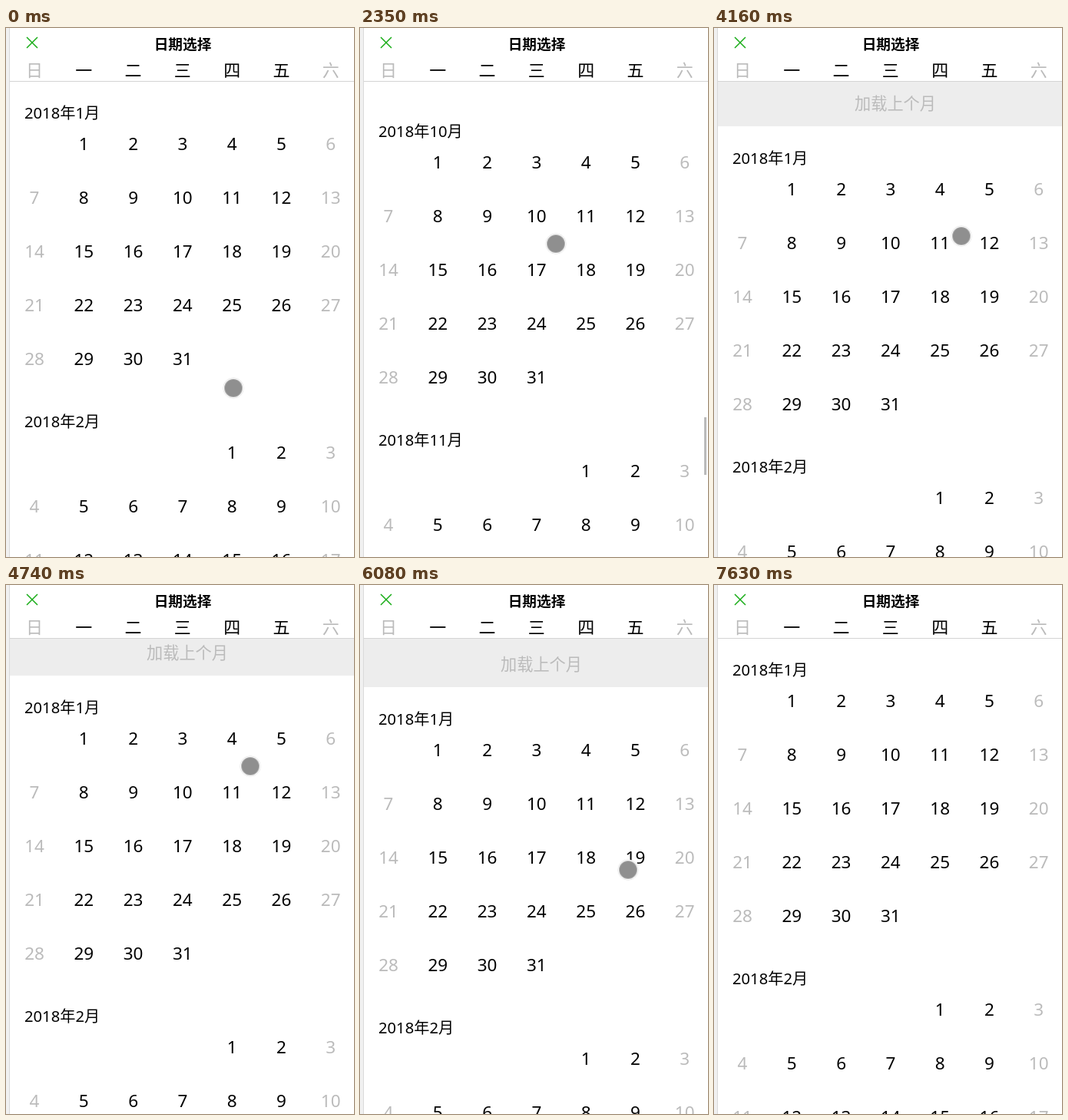
An HTML page for the animation above (8080 ms loop, 453 by 689 pixels).

```html
<!DOCTYPE html>
<html lang="zh">
<head>
<meta charset="utf-8">
<title>日期选择</title>
<style>
  html, body { margin: 0; width: 100%; height: 100%; overflow: hidden; background: #fff; }
  body { position: relative; color: #000; font-family: "Noto Sans", "Noto Sans CJK SC", "Noto Sans CJK", sans-serif; }
  body * { position: absolute; white-space: nowrap; }
  #stage { left: 0; top: 0; width: 453px; height: 689px; overflow: hidden; }
  #edge { left: 0; top: 0; width: 4px; height: 689px; background: #f1f1f1; border-right: 1px solid #dadada; }
  #view { left: 5px; top: 70px; width: 448px; height: 619px; overflow: hidden; }
  #list { left: 0; top: 0; width: 450px; will-change: transform; }
  #band { left: 0; top: -200px; width: 450px; height: 199px; background: #ededed; }
  #band span { left: 178px; bottom: 15px; font-size: 21.2px; line-height: 30px; color: #bbb; }
  .month { left: 19px; font-size: 20.2px; line-height: 30px; }
  .day, .week { width: 64px; text-align: center; line-height: 30px; }
  .day { font-size: 22.5px; }
  .week { font-size: 22px; top: 39px; font-weight: 300; }
  .rest { color: #bbb; }
  #head { left: 5px; top: 0; width: 448px; height: 69px; background: #fff; border-bottom: 1px solid #d4d4d4; }
  #name { left: 0; width: 450px; top: 7px; text-align: center; font-size: 18.7px; font-weight: 700; line-height: 28px; }
  #close { left: 21px; top: 11px; }
  #bar { left: 448px; top: 0; width: 3px; height: 75px; background: #bababa; }
  #dot { left: -11px; top: -11px; width: 22px; height: 22px; border-radius: 50%; background: #8f8f8f;
         box-shadow: 0 0 0 1px #b4b4b4, 0 0 0 2px #fff, 0 0 0 2.5px #ddd; }
</style>
</head>
<body>
<div id="stage">
  <div id="edge"></div>
  <div id="view"><div id="list"><div id="band"><span>加载上个月</span></div></div></div>
  <div id="head">
    <svg id="close" width="16" height="16"><path d="M1 1L15 15M15 1L1 15" stroke="#1aad19" stroke-width="1.5"/></svg>
    <div id="name">日期选择</div>
  </div>
  <div id="bar"></div>
  <div id="dot"></div>
</div>
<script>
const LOOP = 8080, COL = 450 / 7, ROW = 70;
const START = 390, TURN = 2250, BACK = 3970, PULL = 3706, LEAVE = 7000, RETRACT = 7390;
const $ = id => document.getElementById(id);
const list = $('list'), bar = $('bar'), dot = $('dot');

function label(parent, kind, col, text, top) {
  const el = document.createElement('div');
  el.className = kind;
  el.textContent = text;
  if (col !== null) {
    el.style.left = col * COL + 'px';
    if (col % 6 === 0) el.classList.add('rest');
  }
  if (top !== undefined) el.style.top = top + 'px';
  parent.append(el);
}

[...'日一二三四五六'].forEach((ch, i) => label($('head'), 'week', i, ch));

let y0 = 0;
for (let m = 0; m < 12; m++) {
  const first = new Date(2018, m, 1).getDay();
  const days = new Date(2018, m + 1, 0).getDate();
  label(list, 'month', null, `2018年${m + 1}月`, y0 + 25);
  for (let d = 1; d <= days; d++) {
    const cell = first + d - 1;
    label(list, 'day', cell % 7, d, y0 + 66 + Math.floor(cell / 7) * ROW);
  }
  y0 += 52 + Math.ceil((first + days) / 7) * ROW;
}

const ramp = (t, from, to) => {
  const u = Math.min(1, Math.max(0, (t - from) / (to - from)));
  return u * u * (3 - 2 * u);
};

// Eases from one [time, value] key to the next.
const glide = (t, keys) => keys.reduce((v, [time, value], i) =>
  i ? v + (value - keys[i - 1][1]) * ramp(t, keys[i - 1][0], time) : value, 0);

// Flings down the year and back to January.
const scroll = t => 3701 * ramp(t, START, TURN) ** 1.4 * (1 - ramp(t, TURN, BACK));

const dotX = t => glide(t, [[START, 296], [1240, 289], [2350, 255], [4160, 322], [5310, 314], [6080, 349]]);

// Repeated swipes, then slow drags at the top of the list.
const dotY = t => t < PULL
  ? 283 + 186 * Math.cos(2 * Math.PI * Math.max(0, t - START) / 603)
  : glide(t, [[PULL, 97], [4160, 271], [5310, 202], [6080, 371], [6450, 190], [6890, 400]]);

// The list follows the drag like rubber, then snaps back.
const pull = t => t < PULL ? 0
  : 64.2 * (1 - Math.exp(-Math.max(0, dotY(t) - 190) / 31.5)) * (1 - ramp(t, RETRACT, RETRACT + 240));

const move = (el, x, y, shown = true) => {
  el.style.transform = `translate(${Math.round(x)}px, ${Math.round(y)}px)`;
  el.style.visibility = shown ? 'visible' : 'hidden';
};

function draw(t) {
  const s = scroll(t);
  move(list, 0, pull(t) - s);
  move(bar, 0, 72 + s * 0.1187, s >= 1);
  move(dot, dotX(t), dotY(t), t < LEAVE);
}

const begin = performance.now();
function tick() {
  draw((performance.now() - begin) % LOOP);
  requestAnimationFrame(tick);
}
tick();
</script>
</body>
</html>
```
